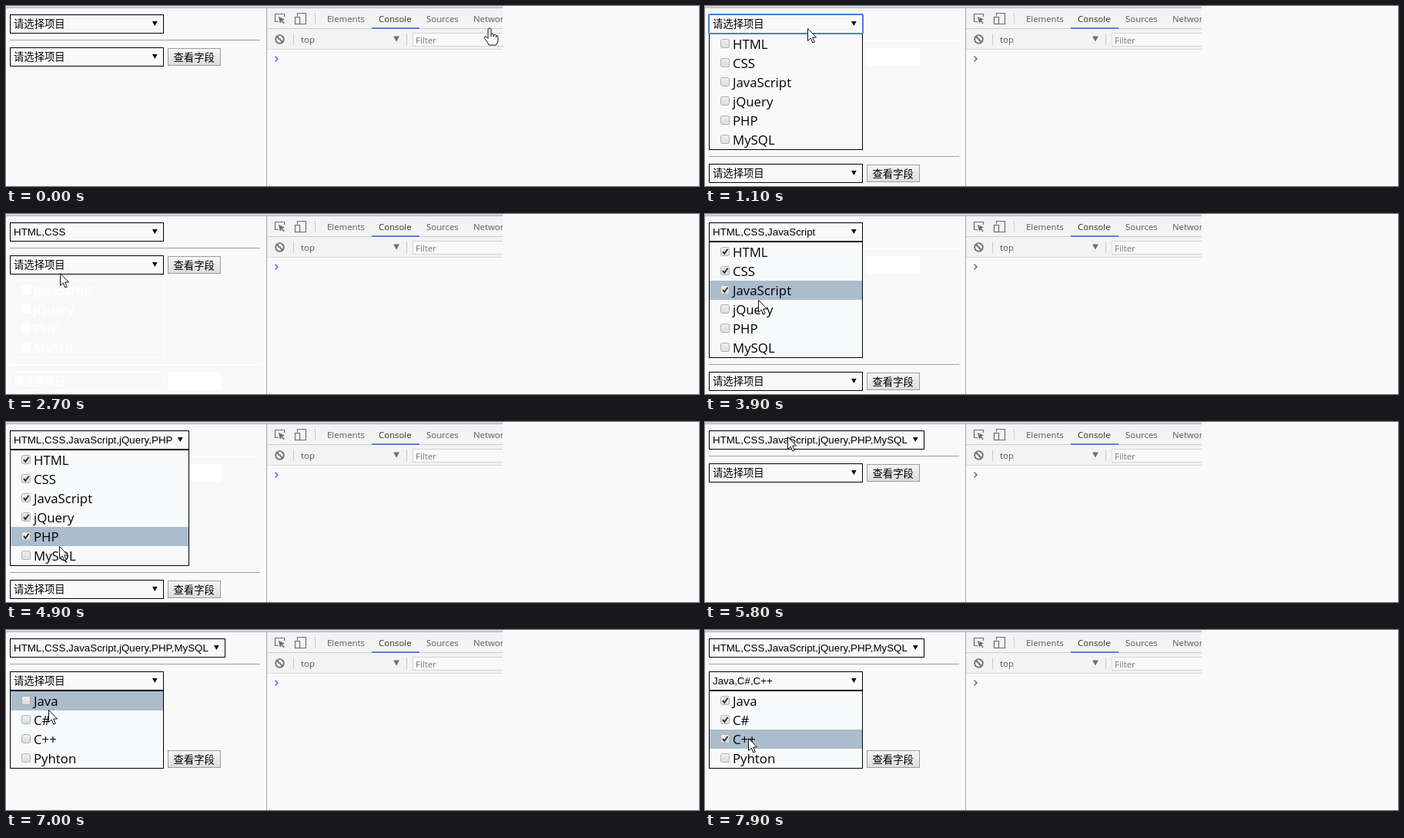
Write an HTML page that moves like this. It is 900 px wide and 235 px high and loops after 8000 ms.

```html
<!DOCTYPE html>
<html lang="zh-CN">
<head>
<meta charset="utf-8">
<style>
  html, body { margin: 0; width: 100%; height: 100%; overflow: hidden; background: #f9f9f9; }
  svg { display: block; }
  text { white-space: pre; }
  .field { font: 13.33px "Liberation Sans", "Noto Sans CJK SC", "Noto Sans CJK", sans-serif; }
  .item { font: 16.8px "Open Sans", "Noto Sans", sans-serif; }
  .tool { font: 11.4px "Open Sans", "Noto Sans", sans-serif; fill: #5a5a5a; }
</style>
</head>
<body>
<svg width="900" height="235" viewBox="0 0 900 235">
  <defs>
    <linearGradient id="btn" x2="0" y2="1"><stop stop-color="#f6f6f6"/><stop offset="1" stop-color="#dcdcdc"/></linearGradient>
    <linearGradient id="chk" x2="0" y2="1"><stop stop-color="#efefef"/><stop offset="1" stop-color="#dcdcdc"/></linearGradient>
    <clipPath id="pane"><rect width="645" height="235"/></clipPath>
  </defs>
  <rect width="900" height="235" fill="#f9f9f9"/>
  <g id="page"></g>
  <g clip-path="url(#pane)">
    <rect width="645" height="2" fill="#d3d4e2"/>
    <rect y="2" width="645" height="1" fill="#b4b4bf"/>
    <rect x="339" y="3" width="306" height="53" fill="#f3f3f3"/>
    <path d="M339 29.5H645" stroke="#cdcdcd"/>
    <path d="M339 56.5H645" stroke="#dcdcdc"/>
    <path d="M338.5 3V235" stroke="#a5a5a5"/>
    <path d="M401.5 9V24M373.5 36V51M520.5 36V51" stroke="#cbcbcb"/>
    <g fill="none" stroke="#6e6e6e" stroke-width="1.2">
      <path d="M354 20.5H349.5V10.5H361.5V14"/>
      <path d="M378.5 13V9.5H389.5V23.5H382"/>
      <rect x="375.5" y="14.5" width="6" height="9"/>
      <g stroke-width="1.8"><circle cx="355.5" cy="43.5" r="5.3"/><path d="M352 40L359 47"/></g>
    </g>
    <path d="M354 14L362 17.5L358.7 18.7L361.8 22L360.5 23.2L357.5 20L356 23Z" fill="#6e6e6e"/>
    <path d="M503 39.5H511L507 46.5Z" fill="#6e6e6e"/>
    <rect x="528.5" y="35.5" width="130" height="17" fill="#f9f9f9" stroke="#d4d4d4"/>
    <g class="tool">
      <text x="417" y="21">Elements</text>
      <text x="484" y="21" fill="#333">Console</text>
      <text x="546" y="21">Sources</text>
      <text x="607" y="21">Network</text>
      <text x="383" y="48">top</text>
      <text x="532" y="49" fill="#757575">Filter</text>
    </g>
    <rect x="475" y="28" width="62" height="2" fill="#4b87e0"/>
    <path d="M349.5 65.5L353 69L349.5 72.5" fill="none" stroke="#3f7fe8" stroke-width="1.6"/>
  </g>
  <g id="cursor" stroke="#111" fill="#fff" stroke-linejoin="round">
    <path id="arrow" d="M.5 .5V16.5L4.2 13L6.8 19L9.3 18L6.7 12H11.5Z"/>
    <path id="hand" d="M-1 2Q1-.5 3 2V9Q5 7.5 6.5 9.5Q8.5 8.5 9.5 10.5Q12 10 12 13V17Q11.5 20 9.5 23H0Q-1 20-3.5 17L-6 13.5Q-5.5 11-3 12.5L-1 14.5ZM3 9V12M6.5 9.5V12.5M9.5 10.5V13"/>
  </g>
</svg>
<script>
const LOOP = 8000, STEP = 100, ROW = 25, TOP = 11;
const HINT = '请选择项目';
const $ = id => document.getElementById(id);
const during = (spans, t) => spans.some(([a, b]) => t >= a && t < b);

const skills = {
  items: ['HTML', 'CSS', 'JavaScript', 'jQuery', 'PHP', 'MySQL'],
  open: [[900, 2600], [3100, 5700]],
  focus: [[800, 1500], [3100, 3600]],
  checkAt: i => 1700 + 500 * i + (i > 1 ? 1000 : 0) // the list is closed for a while after two ticks
};
const languages = {
  items: ['Java', 'C#', 'C++', 'Pyhton'],
  open: [[6400, LOOP]],
  focus: [[6400, 7000]],
  checkAt: i => 7100 + 400 * i
};

// Pointer stops: time, x, y. Even glides in between.
const overRow = i => [skills.checkAt(i), 69, TOP + 26 + ROW * i + 15];
const stops = [
  [0, 627, 28], [250, 345, 4], [500, 117, 28], [1000, 117, 28], [1100, 133, 29], [1200, 133, 29],
  overRow(0), overRow(1), [2500, 72, 24], [2700, 70, 77], [2900, 72, 22], [3200, 72, 22],
  overRow(2), overRow(5), [5800, 107, 19], [5900, 107, 19], [6200, 93, 68], [6500, 93, 68],
  [7000, 55, 104], [7900, 56, 141]
];

function pointer(t) {
  const i = stops.findIndex(s => s[0] >= t) || 1;
  const [t0, x0, y0] = stops[i - 1], [t1, x1, y1] = stops[i];
  const k = (t - t0) / (t1 - t0);
  return [Math.round(x0 + (x1 - x0) * k), Math.round(y0 + (y1 - y0) * k)];
}

const pen = document.createElement('canvas').getContext('2d');
pen.font = '13.33px "Liberation Sans", sans-serif';
const fit = str => Math.max(200, Math.round(pen.measureText(str).width) + 27);

const box = (x, y, w, h, fill, stroke = 'none', more = '') =>
  `<rect x="${x}" y="${y}" width="${w}" height="${h}" fill="${fill}" stroke="${stroke}" ${more}/>`;
const label = (x, y, cls, str, more = '') =>
  `<text x="${x}" y="${y}" class="${cls}" ${more}>${str}</text>`;
const rule = y => box(5, y, 325, 1, '#9c9c9c');
const button = y =>
  box(210.5, y + .5, 68, 22, 'url(#btn)', '#9c9c9c') + label(217.5, y + 17, 'field', '查看字段');

function row(y, name, on, hot, w) {
  return (hot ? box(6, y, w - 2, ROW, '#abbccd') : '') +
    box(20.5, y + 6.5, 11, 11, 'url(#chk)', '#b0b0b0', 'rx="2"') +
    (on ? `<path d="M23 ${y + 12}l2.3 2.8l4.2-6" fill="none" stroke="#333" stroke-width="2"/>` : '') +
    label(36, y + 19, 'item', name);
}

function select({ items, open, focus, checkAt }, y, t, [px, py]) {
  const on = items.map((_, i) => t >= checkAt(i));
  const text = items.filter((_, i) => on[i]).join(',') || HINT;
  const w = fit(text), right = 5 + w;
  let out = '';
  if (during(open, t)) {
    const top = y + 26;
    const hot = px < right ? Math.floor((py - top - 1) / ROW) : -1;
    out += box(5.5, top - .5, w - 1, items.length * ROW + 1, t < 3100 ? '#f9f9f9' : '#f8fafc', '#000') +
      items.map((name, i) => row(top + i * ROW, name, on[i], i === hot, w)).join('');
  }
  out += box(5.5, y + .5, w - 1, 24, '#f9f9f9', '#000');
  if (during(focus, t)) out += box(5, y, w, 25, 'none', '#4a7fd0', 'stroke-width="2" rx="1"');
  return out + label(10, y + 17, 'field', text) + `<path d="M${right - 15} ${y + 9}h6.6l-3.3 6z"/>`;
}

// Pale traces that linger after a repaint.
function traces(t, open) {
  const white = 'fill="#fff" stroke="#fff" stroke-width=".6"';
  if (open) return box(205, 44, 125, 2, '#fff') + box(210, 55, 69, 23, '#fff');
  if (t < 2600 || t >= 3100) return '';
  return box(5.5, 86.5, 199, 101, 'none', '#fff') + box(5, 196, 325, 2, '#fff') +
    box(5.5, 206.5, 199, 24, 'none', '#fff') + box(210, 207, 69, 23, '#fff') +
    label(10, 223, 'field', HINT, white) +
    skills.items.slice(2).map((name, i) =>
      box(20, 93 + i * ROW, 12, 12, '#fff') + label(36, 106 + i * ROW, 'item', name, white)).join('');
}

function draw(t) {
  const tip = pointer(t);
  const open = during(skills.open, t);
  const shift = open ? skills.items.length * ROW + 2 : 0;
  const drop = during(languages.open, t) ? languages.items.length * ROW + 2 : 0;
  $('page').innerHTML = traces(t, open) + rule(44 + shift) + select(skills, TOP, t, tip) +
    select(languages, 54 + shift, t, tip) + button(55 + shift + drop);
  $('cursor').setAttribute('transform', `translate(${tip})`);
  $('hand').style.display = t < 200 ? '' : 'none';
  $('arrow').style.display = t < 200 ? 'none' : '';
}

let start, last = -1;
function tick(now) {
  start ??= now;
  const t = Math.floor((now - start) % LOOP / STEP) * STEP;
  if (t !== last) draw(last = t);
  requestAnimationFrame(tick);
}
draw(0);
requestAnimationFrame(tick);
</script>
</body>
</html>
```
